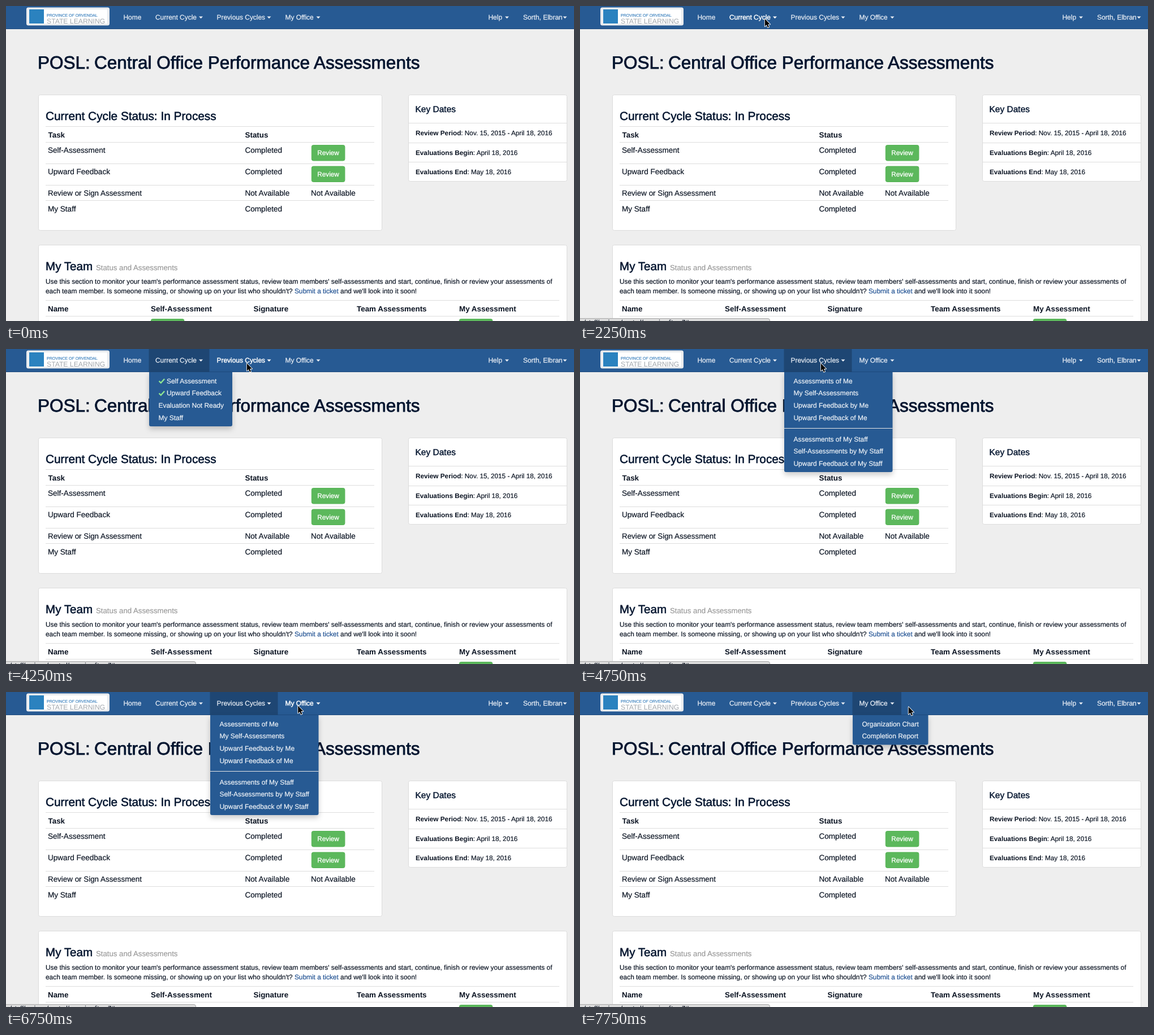
These frames come from a looping animation (1004x558 px, 8000 ms). An HTML page:

```html
<!DOCTYPE html>
<html lang="en">
<head>
<meta charset="utf-8">
<title>Performance Assessments</title>
<style>
  html, body { margin: 0; width: 100%; height: 100%; overflow: hidden; background: #eee; }
  svg { display: block; width: 1004px; height: 558px; font-family: "Liberation Sans", Arial, sans-serif; text-rendering: geometricPrecision; }
  text { fill: #0a1322; stroke: #0a1322; stroke-width: .18px; }
  .head { fill: #04152f; stroke: #04152f; stroke-width: .026em; }
  .body { font-size: 13.55px; }
  .th, .b { font-weight: 700; }
  .th { font-size: 13.4px; }
  .th text, .b { stroke-width: 0; }
  .dates { font-size: 11.75px; }
  .para { font-size: 11.88px; }
  .link { fill: #1d4f91; stroke: #1d4f91; }
  .soft { fill: #999; stroke: #999; }
  .panel { fill: #fff; stroke: #dcdcdc; }
  .rule { fill: none; stroke: #ddd; }
  .btn rect { fill: #5cb85c; stroke: #54b254; }
  .btn text { fill: #fff; stroke: #fff; stroke-width: .3px; font-size: 11.75px; }
  .nav text { fill: #e9eef5; font-size: 11.95px; stroke: #e9eef5; stroke-width: .25px; }
  .nav path { fill: #e9eef5; }
  .nav .hover text { fill: #fff; stroke: #fff; stroke-width: .45px; }
  .nav .hover path { fill: #fff; }
  .tab { fill: #1e4673; }
  .menu { filter: drop-shadow(0 5px 5px rgba(0,0,0,.2)); }
  .menu text { fill: #f1f5f9; stroke: #f1f5f9; stroke-width: .2px; font-size: 11.95px; }
  .drop { fill: #275a93; }
  .tick { fill: none; stroke: #90e690; stroke-width: 2.3; }
</style>
</head>
<body>
<svg viewBox="0 0 1004 558">
  <rect width="1004" height="558" fill="#eee"/>

  <g font-size="31.5">
    <text class="head" x="56" y="110.5">POSL:</text>
    <text class="head" x="156" y="110.5">Central Office Performance Assessments</text>
  </g>

  <rect class="panel" x="57.5" y="157.5" width="607" height="240" rx="3"/>
  <text class="head" x="70" y="202" font-size="20.8">Current Cycle Status: In Process</text>
  <path class="rule" d="M70 213.5H651M70 241.5H651M70 279.5H651M70 317.5H651M70 344.5H651"/>
  <g class="th">
    <text x="74.5" y="232.6">Task</text>
    <text x="422.5" y="232.6">Status</text>
  </g>
  <g class="body">
    <text x="74" y="260.3">Self-Assessment</text>
    <text x="74" y="298.2">Upward Feedback</text>
    <text x="74" y="335.9" font-size="13.4">Review or Sign Assessment</text>
    <text x="74" y="363.6">My Staff</text>
    <text x="422.5" y="260.3">Completed</text>
    <text x="422.5" y="298.2">Completed</text>
    <text x="422.5" y="335.9">Not Available</text>
    <text x="422.5" y="363.6">Completed</text>
    <text x="539" y="335.9">Not Available</text>
  </g>

  <rect class="panel" x="711.5" y="157.5" width="280" height="153" rx="3"/>
  <path class="rule" d="M712 207.5H991M712 242.5H991M712 276.5H991"/>
  <text class="head" x="723.5" y="188.3" font-size="15.5">Key Dates</text>
  <g class="dates">
    <text x="724" y="229.2"><tspan class="b">Review Period</tspan>: Nov. 15, 2015 - April 18, 2016</text>
    <text x="724" y="263.6"><tspan class="b">Evaluations Begin</tspan>: April 18, 2016</text>
    <text x="724" y="298"><tspan class="b">Evaluations End</tspan>: May 18, 2016</text>
  </g>

  <rect class="panel" x="57.5" y="423.5" width="934" height="150" rx="3"/>
  <text class="head" x="70" y="468" font-size="20.6">My Team</text>
  <text class="soft" x="159" y="467.7" font-size="13.2">Status and Assessments</text>
  <g class="para">
    <text x="70" y="492.2">Use this section to monitor your team's performance assessment status, review team members' self-assessments and start, continue, finish or review your assessments of</text>
    <text x="70" y="509">each team member. Is someone missing, or showing up on your list who shouldn't? <tspan class="link">Submit a ticket</tspan> and we'll look into it soon!</text>
  </g>
  <path class="rule" d="M70 521.5H978M70 549.5H978"/>
  <g class="th">
    <text x="74" y="540.6">Name</text>
    <text x="256" y="540.6">Self-Assessment</text>
    <text x="437.5" y="540.6">Signature</text>
    <text x="620" y="540.6">Team Assessments</text>
    <text x="801" y="540.6">My Assessment</text>
  </g>
  <g id="buttons"></g>

  <g id="status">
    <path d="M-1 560V553.5H332Q335.5 553.5 335.5 557V560Z" fill="#dcdcdc" stroke="#a8a8a8"/>
    <text id="hint" x="7" y="564.2" font-size="11.2"></text>
  </g>

  <rect width="1004" height="41" fill="#275a93"/>
  <rect y="40" width="1004" height="1" fill="#1f4c80"/>
  <rect x="36" y="2.5" width="147" height="32" rx="3.5" fill="#e9ebee"/>
  <rect x="40" y="6" width="139" height="25.5" fill="#fff"/>
  <rect x="41" y="6" width="26" height="25" fill="#2b82bf"/>
  <text x="72" y="18.8" font-size="7.1" style="fill:#3f83bf;stroke:#3f83bf">PROVINCE OF ORVENDAL</text>
  <text x="72" y="30.7" font-size="12.2" style="fill:#a3a8ae;stroke:none">STATE LEARNING</text>
  <g class="nav" id="nav"></g>
  <g id="menus"></g>

  <path id="cursor" d="M0 0V13.2L3 10.4L5.1 15.2L7.2 14.3L5.2 9.6H9.2Z" fill="#000" stroke="#fff" stroke-width="1.8" stroke-linejoin="round" paint-order="stroke"/>
</svg>
<script>
const LOOP = 8000;
const $ = id => document.getElementById(id);

function add(parent, tag, attrs, text) {
  const el = document.createElementNS('http://www.w3.org/2000/svg', tag);
  for (const key in attrs) el.setAttribute(key, attrs[key]);
  if (text) el.textContent = text;
  return parent.appendChild(el);
}

function button(x, y) {
  const g = add($('buttons'), 'g', { class: 'btn' });
  add(g, 'rect', { x: x + .3, y: y + .5, width: 58.6, height: 27.5, rx: 3 });
  add(g, 'text', { x: x + 29.5, y: y + 18.4, 'text-anchor': 'middle' }, 'Review');
}

function navItem(x, label, caret) {
  const g = add($('nav'), 'g', {});
  add(g, 'text', { x, y: 23.9 }, label);
  if (caret) add(g, 'path', { d: `M${caret - 3.5} 18.5h7l-3.5 3.7z` });
  return g;
}

// An empty item is a divider; a leading "+" marks a ticked one.
function dropdown({ left, width, height, items }) {
  const g = add($('menus'), 'g', { class: 'menu' });
  add(g, 'path', {
    class: 'drop',
    d: `M${left} 41h${width}v${height - 3}q0 3 -3 3h${6 - width}q-3 0 -3 -3z`
  });
  let y = 60.7;
  for (const item of items) {
    if (!item) {
      add(g, 'rect', { x: left, y: y - 7.7, width, height: 1, fill: '#e5e5e5' });
      y += 15.8;
      continue;
    }
    const ticked = item[0] === '+';
    const x = left + 16.5;
    if (ticked) add(g, 'path', { class: 'tick', d: `M${x + 1} ${y - 4}l3.3 3.4l6.3 -7` });
    add(g, 'text', { x: ticked ? x + 14.5 : x, y }, ticked ? item.slice(1) : item);
    y += 21.75;
  }
  return g;
}

[[540, 246], [540, 283.5], [256, 554], [801, 554]].forEach(p => button(...p));

const menus = [
  { label: 'Current Cycle', x: 264, caret: 344.5, left: 253, tab: 107, width: 147, height: 96,
    items: ['+Self Assessment', '+Upward Feedback', 'Evaluation Not Ready', 'My Staff'] },
  { label: 'Previous Cycles', x: 372.5, caret: 465, left: 361, tab: 120, width: 191.5, height: 177,
    items: ['Assessments of Me', 'My Self-Assessments', 'Upward Feedback by Me', 'Upward Feedback of Me', '',
            'Assessments of My Staff', 'Self-Assessments by My Staff', 'Upward Feedback of My Staff'] },
  { label: 'My Office', x: 493.5, caret: 552, left: 482, tab: 86.5, width: 133.5, height: 52.5,
    items: ['Organization Chart', 'Completion Report'] }
];

for (const m of menus) {
  m.tabEl = add($('nav'), 'rect', { class: 'tab', x: m.left - .5, width: m.tab, height: 41 });
}
navItem(207.5, 'Home');
for (const m of menus) {
  m.link = navItem(m.x, m.label, m.caret);
  m.drop = dropdown(m);
}
navItem(852.5, 'Help', 885.5);
navItem(914, 'Sorth, Elbran', 988);

// [start ms, value...]
const moves = [
  [0, -40, -40], [500, 306.8, 1], [750, 310, 28.8], [1000, 319.8, 31.5], [1250, 319.8, 30.8],
  [2000, 326.8, 22.8], [3750, 363, 22.8], [4000, 397.3, 26], [4250, 425.8, 25.5], [5500, 426, 24.8],
  [5750, 490, 26], [6000, 514.5, 25], [6250, 516.2, 25], [6750, 516.2, 24.5],
  [7500, 547.8, 24.5], [7750, 580.7, 26.3]
];
const opens = [[0, -1], [2750, 0], [4750, 1], [7000, 2]];
const hovers = [[0, -1], [2000, 0], [2750, -1], [3750, 1], [4750, -1], [5750, 2], [7000, -1]];
const hints = [
  [0, ''],
  [2000, '/staff/reviews/central/overview/cycle/open/begin/item7#'],
  [2250, '/staff/reviews/central/overview/item7#']
];

const at = (steps, t) => steps.findLast(s => s[0] <= t);

function draw(t) {
  const [, x, y] = at(moves, t);
  const open = at(opens, t)[1];
  const hover = at(hovers, t)[1];
  const hint = at(hints, t)[1];
  $('cursor').setAttribute('transform', `translate(${x} ${y})`);
  menus.forEach((m, i) => {
    m.tabEl.style.display = m.drop.style.display = i === open ? '' : 'none';
    m.link.setAttribute('class', i === hover ? 'hover' : '');
  });
  $('status').style.display = hint ? '' : 'none';
  if ($('hint').textContent !== hint) $('hint').textContent = hint;
}

const start = performance.now();
function tick() {
  draw((performance.now() - start) % LOOP);
  requestAnimationFrame(tick);
}
tick();
</script>
</body>
</html>
```
